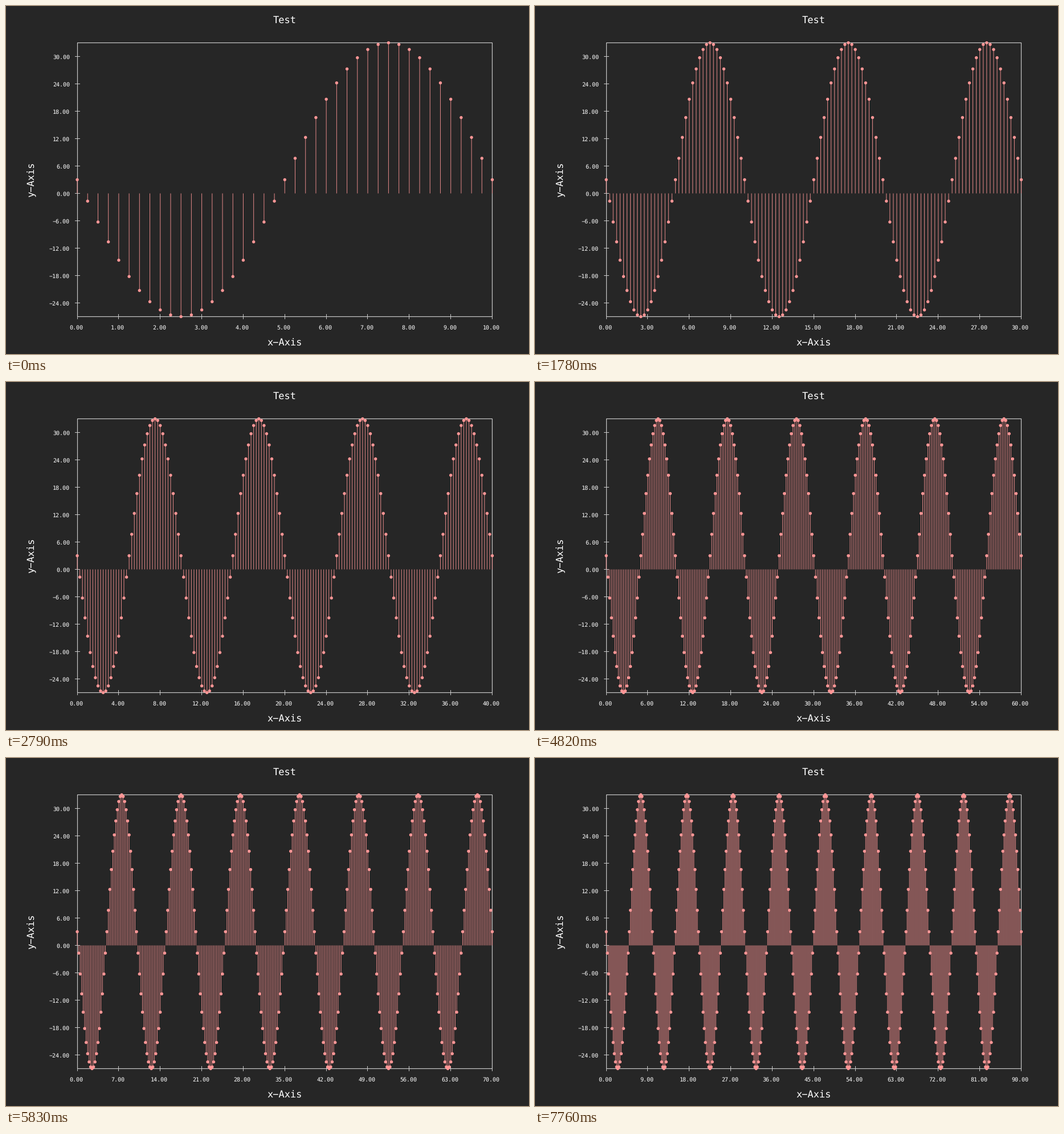
Animation, 918 px wide and 610 px high, one loop 7920 ms. Source, as a matplotlib script:

```python
import numpy as np
import matplotlib.pyplot as plt
from matplotlib.animation import FuncAnimation

W, H, DPI = 918, 610, 64
PX = 72 / DPI                      # points per pixel
LOOP, STEP = 7920, 20
CHANGES = [760, 1780, 2790, 3800, 4820, 5830, 6750, 7760]

BG, AXIS, TEXT, PINK = "#262626", "#c8c8c8", "#ffffff", "#ff9696"
LEFT, RIGHT, TOP, BOTTOM = 125.05, 853.55, 64.5, 544.5
Y_MIN, Y_MAX = -27, 33
SPACING, RADIUS = 0.25, 2.7
MINUS = "\u2212"

plt.rcParams["font.family"] = "DejaVu Sans Mono"
plt.rcParams["text.hinting"] = "none"
plt.rcParams["path.simplify"] = False

fig = plt.figure(figsize=(W / DPI, H / DPI), dpi=DPI, facecolor=BG)
ax = fig.add_axes([0, 0, 1, 1])
ax.set_xlim(0, W)
ax.set_ylim(H, 0)
ax.axis("off")


def to_y(v):
    return BOTTOM - (v - Y_MIN) * (BOTTOM - TOP) / (Y_MAX - Y_MIN)


def column(x):
    """Centre of the pixel column that holds x."""
    return np.floor(x) + 0.5


def line(xs, ys, color=AXIS, width=1.0, **kw):
    return ax.plot(xs, ys, color=color, lw=width * PX, snap=False,
                   solid_capstyle="butt", solid_joinstyle="miter", **kw)[0]


def label(x, y, s, size=10, ha="center", **kw):
    return ax.text(x, y, s.replace("-", MINUS), color=TEXT, ha=ha,
                   fontsize=size * PX, va="baseline", **kw)


# Frame, ticks and fixed labels
x0, x1 = column(LEFT), column(RIGHT)
line([x0, x1, x1, x0, x0], [TOP, TOP, BOTTOM, BOTTOM, TOP], width=1.2)

for v in range(-24, 31, 6):
    y = to_y(v)
    line([x0 - 4.5, x0 + 4.5], [y, y])
    label(112, y + 4.5, f"{v:.2f}", ha="right")

x_labels = []
for x in np.linspace(LEFT, RIGHT, 11):
    c = column(x)
    line([c, c], [BOTTOM - 4.5, BOTTOM + 4.5])
    x_labels.append(label(x - 1.7, 567, ""))

label(489.3, 30, "Test", 17)
label(489.3, 596, "x-Axis", 17)
label(50, 304, "y-Axis", 17, rotation=90, rotation_mode="anchor")

# Stem plot; a collection keeps the dots at sub-pixel positions
stems = line([], [], PINK, alpha=0.88, zorder=3)
dots = ax.scatter([], [], s=(2 * RADIUS * PX) ** 2, color=PINK,
                  edgecolors="none", linewidths=0, zorder=4)


def update(i):
    # changes between two ticks fall on the earlier one
    t = i * STEP + STEP / 2
    x_max = 10 * (1 + sum(c <= t for c in CHANGES))

    x = np.arange(0, x_max + SPACING / 2, SPACING)
    px = LEFT + x / x_max * (RIGHT - LEFT)
    py = to_y(3 - 30 * np.sin(2 * np.pi * x / 10))
    base = np.full_like(px, to_y(0))
    gap = np.full_like(px, np.nan)

    stems.set_data(np.column_stack([px, px, gap]).ravel(),
                   np.column_stack([base, py, gap]).ravel())
    dots.set_offsets(np.column_stack([px, py]))
    for k, txt in enumerate(x_labels):
        txt.set_text(f"{k * x_max / 10:.2f}")
    return [stems, dots, *x_labels]


anim = FuncAnimation(fig, update, frames=LOOP // STEP, interval=STEP,
                     repeat=True, repeat_delay=0, blit=False)
plt.show()
```
